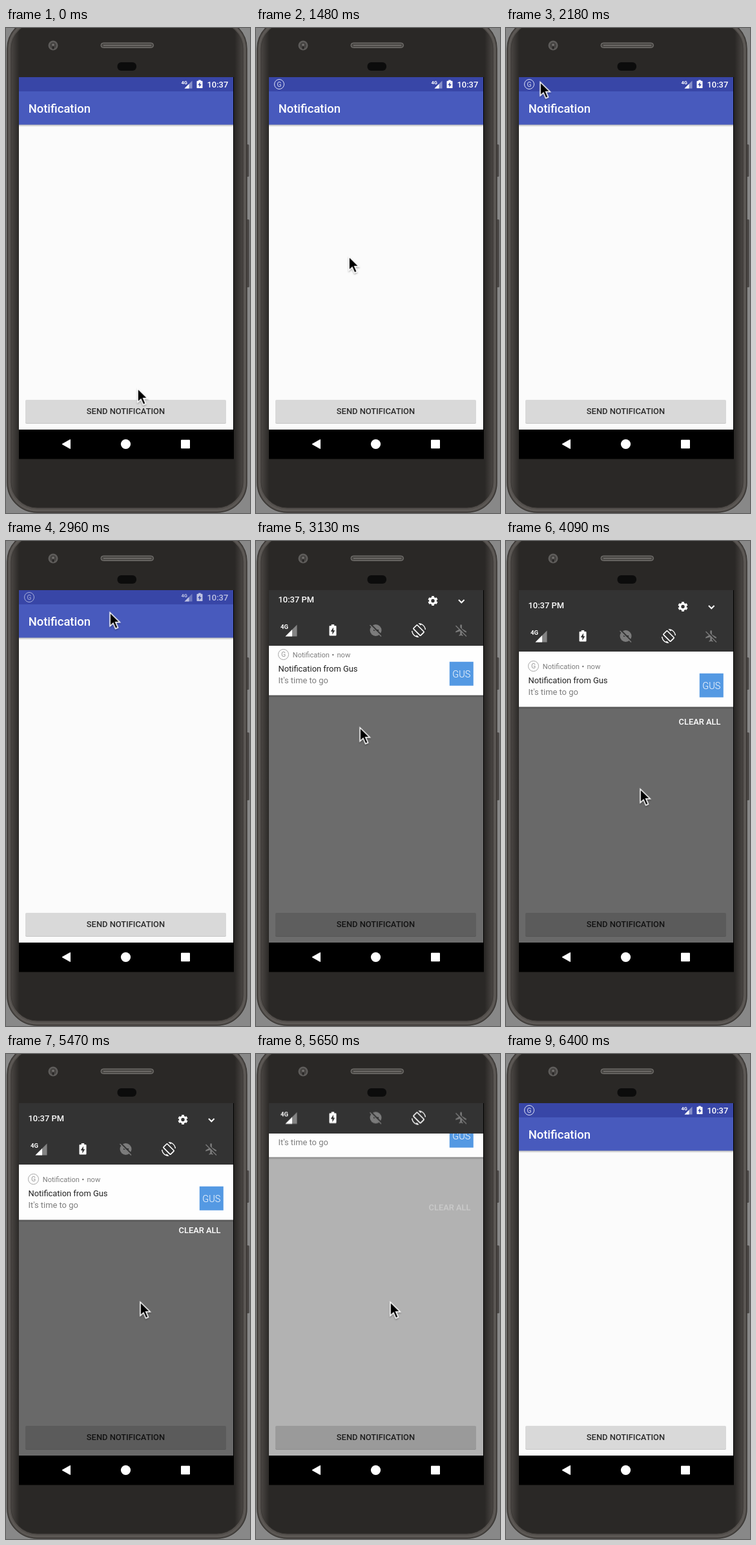
Recreate the animation shown at these times as an HTML page. Size 378 by 750 pixels, loop 6.5 s.

```html
<!DOCTYPE html>
<html lang="en">
<head>
<meta charset="utf-8">
<title>Notification demo</title>
<style>
html, body { margin: 0; width: 100%; height: 100%; overflow: hidden; background: #888; }
svg { display: block; width: 378px; height: 750px; }
text { font: 12.9px Roboto, sans-serif; }
.medium { font-weight: 500; }
.small { font-size: 11.06px; }
.title { font-size: 18.4px; }
.mid { text-anchor: middle; }

.cursor, .shade, .notice, .scrim, .clear, .status, .badge, .press {
  animation: 6500ms linear infinite;
}
.cursor { animation-name: point; }
.shade, .notice { animation-name: drop; }
.scrim { animation-name: dim; }
.clear { animation-name: clear; }
.status { animation-name: status; }
.badge { animation-name: badge; }
.press { animation-name: press; }

/* Motion advances in ticks of about 87 ms; each segment counts its ticks. */
@keyframes point {
  0% { transform: translate(203px, 556px); }
  2.67% { transform: translate(203px, 556px); animation-timing-function: steps(5); }
  9.38% { transform: translate(189px, 586px); }
  14.77% { transform: translate(189px, 586px); animation-timing-function: steps(6); }
  22.77% { transform: translate(143px, 352px); animation-timing-function: steps(8); }
  33.54% { transform: translate(52px, 82px); }
  34.82% { transform: translate(52px, 82px); animation-timing-function: steps(5); }
  41.54% { transform: translate(160px, 84px); animation-timing-function: steps(3); }
  45.54% { transform: translate(160px, 109px); animation-timing-function: steps(2); }
  48.15% { transform: translate(160px, 287px); animation-timing-function: steps(2); }
  50.87% { transform: translate(172px, 420px); animation-timing-function: steps(2); }
  53.54% { transform: translate(178px, 436px); }
  56.15% { transform: translate(178px, 436px); opacity: 1; animation-timing-function: steps(5); }
  62.92% { transform: translate(207px, 382px); }
  94.92% { transform: translate(207px, 382px); opacity: 1; animation-timing-function: step-end; }
  96.31%, 100% { transform: translate(207px, 382px); opacity: 0; }
}
@keyframes drop {
  0% { transform: translateY(-97px); }
  45.54% { transform: translateY(-97px); animation-timing-function: steps(2); }
  48.15% { transform: translateY(-9px); animation-timing-function: steps(3); }
  52.15%, 84.15% { transform: none; animation-timing-function: steps(4); }
  89.54%, 100% { transform: translateY(-97px); }
}
@keyframes dim {
  0% { opacity: 0; }
  45.54% { opacity: 0; animation-timing-function: steps(2); }
  48.15% { opacity: .57; animation-timing-function: steps(3); }
  52.15%, 84.15% { opacity: .584; animation-timing-function: steps(4); }
  89.54%, 100% { opacity: 0; }
}
@keyframes clear {
  0%, 48.15% { opacity: 0; transform: none; animation-timing-function: steps(6); }
  56.15%, 82.8% { opacity: 1; transform: none; animation-timing-function: step-end; }
  84.15% { opacity: 1; transform: translateY(-7px); animation-timing-function: steps(3); }
  88.15%, 100% { opacity: 0; transform: translateY(-60px); }
}
@keyframes status {
  0%, 42.92% { opacity: 1; animation-timing-function: steps(2); }
  45.54% { opacity: .68; animation-timing-function: steps(2); }
  48.15%, 88.15% { opacity: 0; animation-timing-function: steps(4); }
  93.69%, 100% { opacity: 1; }
}
@keyframes badge {
  0%, 13.38% { opacity: 0; animation-timing-function: steps(2); }
  16.15%, 100% { opacity: 1; }
}
@keyframes press {
  0%, 8% { opacity: 0; animation-timing-function: steps(3); }
  12%, 14.77% { opacity: 1; animation-timing-function: steps(4); }
  20.15%, 100% { opacity: 0; }
}
</style>
</head>
<body>
<svg viewBox="0 0 378 750">
  <defs>
    <clipPath id="screen"><path d="M20 76h332v545H20z"/></clipPath>
    <linearGradient id="face">
      <stop offset="0" stop-color="#4a4643"/>
      <stop offset=".035" stop-color="#2a2826"/>
      <stop offset=".965" stop-color="#2a2826"/>
      <stop offset="1" stop-color="#4a4643"/>
    </linearGradient>
    <linearGradient id="fade" x2="0" y2="1">
      <stop offset="0" stop-opacity=".3"/>
      <stop offset="1" stop-opacity="0"/>
    </linearGradient>
    <filter id="soft" x="-10%" y="-50%" width="120%" height="200%">
      <feDropShadow dx="0" dy="2" stdDeviation="1.800" flood-opacity=".4"/>
    </filter>
    <filter id="tip" x="-50%" y="-30%" width="200%" height="180%">
      <feDropShadow dx="0" dy="1.500" stdDeviation="1" flood-opacity=".35"/>
    </filter>
    <g id="cell">
      <path d="M0 12L12 0v12z" opacity=".4"/>
      <path d="M0 12L7 5v7z"/>
    </g>
    <path id="battery" fill-rule="evenodd" d="M3 0h4v1.500h2q1 0 1 1V13q0 1-1 1H1q-1 0-1-1V2.500q0-1 1-1h2zM5.800 3.500L2 8.700h2.400v3.800L8 7.300H5.800z"/>
  </defs>

  <!-- phone -->
  <rect x="372" y="180" width="4.500" height="50" rx="1.500" fill="#4d4a48"/>
  <rect x="372" y="296" width="5" height="105" rx="1.500" fill="#4d4a48"/>
  <rect x="2" y="-14" width="371" height="763" rx="46" fill="#55514e" stroke="#383532" stroke-width="1.500"/>
  <rect x="5" y="-11" width="365" height="757" rx="43" fill="none" stroke="#67635f"/>
  <rect x="8" y="-8" width="359" height="750" rx="40" fill="url(#face)" stroke="#3a3734"/>
  <circle cx="73" cy="27" r="7.500" fill="#5f5d5b"/>
  <circle cx="73" cy="27" r="5" fill="#454341"/>
  <circle cx="73" cy="26" r="1.800" fill="#757371"/>
  <path d="M73 28.500v4" stroke="#242322" stroke-width="2.500"/>
  <rect x="147" y="23" width="81.500" height="7.500" rx="3.700" fill="#4a4845" stroke="#7d7b78"/>
  <path d="M151 27h74" stroke="#696663" stroke-width="2"/>
  <rect x="172.500" y="53" width="29.500" height="13" rx="6" fill="#0c0c0c"/>
  <path d="M20 76h333v590.500H20z"/>

  <g clip-path="url(#screen)">
    <!-- app -->
    <path d="M20 76h332v546H20z" fill="#fbfbfb"/>
    <path d="M20 149h332v4H20z" fill="url(#fade)"/>
    <path d="M20 76h332v22H20z" fill="#3846a7"/>
    <path d="M20 98h332v51.500H20z" fill="#485abd"/>
    <text class="title medium" x="34.700" y="131" fill="#fff">Notification</text>
    <rect x="30" y="576" width="311" height="36" rx="2" fill="#c8c8c8"/>
    <rect x="30" y="575" width="311" height="36" rx="2" fill="#d9d9d9"/>
    <rect class="press" x="30" y="575" width="311" height="36" rx="2" fill="#c3c3c3" filter="url(#soft)"/>
    <text class="medium mid" x="185.500" y="597" fill="#2c2c2c">SEND NOTIFICATION</text>

    <g class="status" fill="#fff">
      <g class="badge">
        <circle cx="36" cy="87" r="7.500" fill="none" stroke="#dde0f4"/>
        <text class="mid" x="36" y="90.500" style="font-size:10px" fill="#dde0f4">G</text>
      </g>
      <text x="271.500" y="86.500" style="font-size:7.500px;font-weight:700">4G</text>
      <use href="#cell" x="276.500" y="81.500"/>
      <use href="#battery" transform="translate(295.500 80.500) scale(.9)"/>
      <text class="medium" x="311.500" y="91.500">10:37</text>
    </g>

    <path class="scrim" d="M20 76h332v546H20z"/>
    <text class="clear medium" x="267.500" y="283.700" fill="#fff">CLEAR ALL</text>

    <!-- notification shade -->
    <g class="shade">
      <g class="notice">
        <path d="M20 256h332v4H20z" fill="url(#fade)"/>
        <path d="M20 150h332v106.500H20z" fill="#fefefe"/>
        <circle cx="42.500" cy="193.500" r="8" fill="none" stroke="#a6a6a6"/>
        <text class="mid" x="42.500" y="197.200" style="font-size:10.500px" fill="#999">G</text>
        <g fill="#7d7d7d">
          <text class="small" x="56.800" y="197.500">Notification</text>
          <circle cx="119.300" cy="194" r="1.300"/>
          <text class="small" x="125.500" y="197.500">now</text>
          <text x="34.500" y="237.700">It's time to go</text>
        </g>
        <text x="34.500" y="219.700" fill="#212121">Notification from Gus</text>
        <path d="M299.800 204.700h37v37h-37z" fill="#5499e3"/>
        <text class="mid" x="318.300" y="229" style="font-size:14.600px;font-weight:300" fill="#fff">GUS</text>
      </g>
      <path d="M20 -40h332v211H20z" fill="#333"/>
      <g fill="#fff">
        <text class="medium" x="34.500" y="103.900">10:37 PM</text>
        <g fill="none" stroke="#fff" transform="translate(274 101.500)">
          <circle r="4.300" stroke-width="3.200"/>
          <circle r="6.400" stroke-width="2.400" pathLength="48" stroke-dasharray="4.600 3.400" stroke-dashoffset="-1.700"/>
        </g>
        <path d="M314 100l4.300 4.300 4.300-4.300" fill="none" stroke="#fff" stroke-width="2"/>
        <text x="38" y="145.300" style="font-size:9.500px;font-weight:700">4G</text>
        <use href="#cell" transform="translate(45.500 138.500) scale(1.500)"/>
        <use href="#battery" transform="translate(113.500 138) scale(1.100 1.250)"/>
        <g transform="translate(241 136) scale(.92)">
          <rect x="-4.500" y="-8.500" width="9" height="17" rx="1" transform="translate(12 12) rotate(-45)" fill="none" stroke="#fff" stroke-width="1.800"/>
          <path id="turn" d="M16.500 2.500C19.800 4 22.100 7.200 22.500 11H24C23.400 4.800 18.300 0 12 0l-.7 0 3.800 3.800z"/>
          <use href="#turn" transform="rotate(180 12 12)"/>
        </g>
      </g>
      <g fill="#7b7b7b">
        <circle cx="185.500" cy="147" r="9"/>
        <path d="M182 147h8" stroke="#333" stroke-width="2"/>
        <path d="M177.500 137.500l17.500 17.500" stroke="#333" stroke-width="2"/>
        <path d="M176.500 139l17.500 17.500" stroke="#7b7b7b" stroke-width="1.500"/>
        <path transform="translate(307.500 136.500) scale(.88)" d="M21 16v-2l-8-5V3.500a1.500 1.500 0 0 0-3 0V9l-8 5v2l8-2.500V19l-2 1.500V22l3.500-1 3.500 1v-1.500L13 19v-5.500z"/>
        <path d="M310.500 138.500l16.500 16.500" stroke="#333" stroke-width="2"/>
        <path d="M309.500 140l16.500 16.500" stroke="#7b7b7b" stroke-width="1.500"/>
      </g>
    </g>
  </g>

  <!-- navigation bar -->
  <g fill="#fff">
    <path d="M87 643.500l12.500-7v14z" stroke="#fff" stroke-linejoin="round"/>
    <circle cx="185.500" cy="643.500" r="7.600"/>
    <rect x="271" y="636.700" width="14" height="13.500" rx="1"/>
  </g>

  <g class="cursor">
    <path transform="scale(1.050)" d="M1 1.500V21.500L5.700 17.200 9.200 25.300 12.800 23.700 9.300 15.800H15.500z" stroke="#fff" stroke-width="1.500" filter="url(#tip)"/>
  </g>
</svg>
</body>
</html>
```
